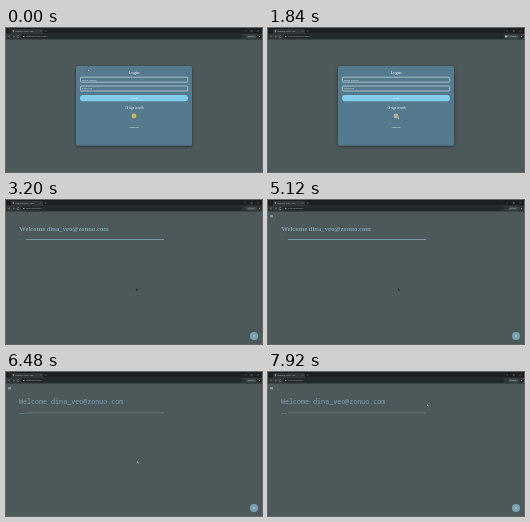
Recreate the animation shown at these times as an HTML page. Size 256 by 144 pixels, loop 8 s.

```html
<!DOCTYPE html>
<html lang="en">
<head>
<meta charset="utf-8">
<title>Login demo</title>
<style>
  html, body { margin: 0; width: 100%; height: 100%; overflow: hidden; background: #4d585b; }
  svg { display: block; width: 100%; height: 100%; }
  text { font-family: "Liberation Serif", serif; fill: #fff; }
  .ui { font-family: "Open Sans", sans-serif; font-size: 2.3px; fill: #b9bdbf; }
  .mid { text-anchor: middle; }
  .accent { fill: #7aa0b0; }
  .mono { font-family: "Noto Sans Mono", monospace; }
  .field { fill: none; stroke: #dce7ec; stroke-width: .6; }

  /* 1% of the loop is one 80 ms step */
  .login, .home, .serif, .web, .menu, .busy, .arrow, .icon {
    animation: 8s step-end infinite;
  }
  .login { animation-name: login; }
  .home { animation-name: home; }
  .serif { animation-name: serif; }
  .web { animation-name: web; }
  .menu { animation-name: menu; }
  .busy { animation-name: busy; }
  .icon { animation-name: icon; }
  .arrow { animation-name: tint; }
  .cursor { animation: move 8s linear infinite; }

  @keyframes login { 0% { opacity: 1 } 40%, 100% { opacity: 0 } }
  @keyframes home { 0% { opacity: 0 } 40%, 100% { opacity: 1 } }
  @keyframes serif { 0% { opacity: 1 } 65%, 100% { opacity: 0 } }
  @keyframes web { 0% { opacity: 0 } 65%, 100% { opacity: 1 } }
  @keyframes menu { 0% { opacity: 0 } 64%, 100% { opacity: 1 } }
  @keyframes busy { 0% { opacity: 0 } 23% { opacity: 1 } 37%, 100% { opacity: 0 } }
  @keyframes icon { 0% { fill: #cdb552 } 22% { fill: #aeb49a } 37%, 100% { fill: #cdb552 } }
  @keyframes tint { 0% { fill: #e8eef0 } 40% { fill: #30383b } 81%, 100% { fill: #f2f5f6 } }
  @keyframes move {
    0%, 2% { transform: translate(82px, 41px); animation-timing-function: steps(3) }
    5% { transform: translate(89px, 47px); animation-timing-function: steps(5) }
    10% { transform: translate(124px, 84px); animation-timing-function: steps(3) }
    13%, 20% { transform: translate(131px, 90px); animation-timing-function: steps(5) }
    25% { transform: translate(129px, 88px); animation-timing-function: step-end }
    30% { transform: translate(130px, 88px); animation-timing-function: step-end }
    81% { transform: translate(131px, 89px); animation-timing-function: step-end }
    90% { transform: translate(131px, 89px); animation-timing-function: steps(5) }
    95% { transform: translate(190px, 48px); animation-timing-function: steps(4) }
    99%, 100% { transform: translate(159px, 32px) }
  }
</style>
</head>
<body>
<svg viewBox="0 0 256 144" preserveAspectRatio="none">
  <defs>
    <filter id="shade" x="-10%" y="-10%" width="120%" height="125%">
      <feDropShadow dx="0" dy="1" stdDeviation="1.5" flood-color="#000" flood-opacity=".5"/>
    </filter>
  </defs>
  <rect width="256" height="144" fill="#4d585b"/>

  <!-- browser bar -->
  <rect width="256" height="6" fill="#1b1f21"/>
  <path d="M5 6V2q0-1 1-1h30q1 0 1 1v4z" fill="#303537"/>
  <rect y="5.4" width="256" height="6.2" fill="#303537"/>
  <rect x="15" y="6.3" width="221" height="4.4" rx="2.2" fill="#23282a"/>
  <circle cx="7.4" cy="3" r=".8" fill="#8eb4c2"/>
  <text class="ui" x="9.3" y="3.9">Sample Web App</text>
  <path d="M34 2.4l1.2 1.2m0-1.2L34 3.6M39 3h1.6m-.8-.8v1.6M238.5 3h1.5m5-.7h1.4v1.4H245zM251.5 2.3l1.4 1.4m0-1.4l-1.4 1.4" fill="none" stroke="#8c9294" stroke-width=".35"/>
  <path d="M3.8 7.8L2.6 8.5l1.2.7M7.2 7.8l1.2.7-1.2.7M13 8.1a1 1 0 1 0 .1.8" fill="none" stroke="#b4b9bb" stroke-width=".4"/>
  <circle cx="17.8" cy="8.5" r=".7" fill="#9da3a5"/>
  <rect x="240" y="6.7" width="10.5" height="3.6" rx="1.8" fill="#454c4f"/>
  <text class="ui" x="241.8" y="9.3">Guest</text>
  <circle cx="253.4" cy="8.5" r=".5" fill="#a5aaac"/>
  <rect class="busy" x="237" y="7.4" width="2.4" height="2" fill="#b4b9bb"/>

  <g class="login">
    <text class="ui" x="20" y="9.3">localhost:3000/login</text>
    <rect x="70" y="38" width="116" height="79.5" rx="2" fill="#547a8e" filter="url(#shade)"/>
    <text class="mid" x="128" y="45.7" font-size="4.6">Login</text>
    <rect class="field" x="74.4" y="49.2" width="107.3" height="5" rx=".6"/>
    <text x="76" y="52.5" font-size="2.6" fill-opacity=".85">Email address</text>
    <rect class="field" x="74.4" y="58" width="107.3" height="5" rx=".6"/>
    <text x="76" y="61.3" font-size="2.6" fill-opacity=".85">Password</text>
    <rect x="74" y="67" width="108" height="6.2" rx="3" fill="#82cbea"/>
    <text class="mid" x="128" y="71" font-size="2.7">Login</text>
    <text class="mid" x="128.5" y="81.4" font-size="3">Or sign in with</text>
    <circle class="icon" cx="128" cy="88" r="2.4"/>
    <text class="mid" x="128" y="99.9" font-size="2.9">Sign up</text>
  </g>

  <g class="home">
    <text class="ui" x="20" y="9.3">localhost:3000</text>
    <path class="menu" d="M2 15.7h3M2 16.8h3" stroke="#c6d1d5" stroke-width=".6"/>
    <g class="serif">
      <text class="accent" x="13.3" y="31.3" font-size="6.65" font-weight="700">Welcome dina_veo@zonuo.com</text>
      <text class="accent" x="13.8" y="40.3" font-size="2.5">«</text>
      <rect class="accent" x="20" y="39" width="138" height=".9"/>
    </g>
    <g class="web">
      <text class="accent mono" x="13" y="32" font-size="6.7">Welcome dina_veo@zonuo.com</text>
      <text class="accent mono" x="13" y="41.8" font-size="2.5">Home</text>
      <rect class="accent" x="20" y="40.7" width="138" height=".5" opacity=".8"/>
    </g>
    <circle class="accent" cx="248" cy="136" r="4.1"/>
    <path d="M247 136h2m-1-1v2" stroke="#c9dce4" stroke-width=".4"/>
  </g>

  <g class="cursor">
    <path class="arrow" d="M0 0v2.6l.6-.6.5 1 .5-.2-.4-1h.8z" stroke="#20282b" stroke-width=".2"/>
  </g>
</svg>
</body>
</html>
```
